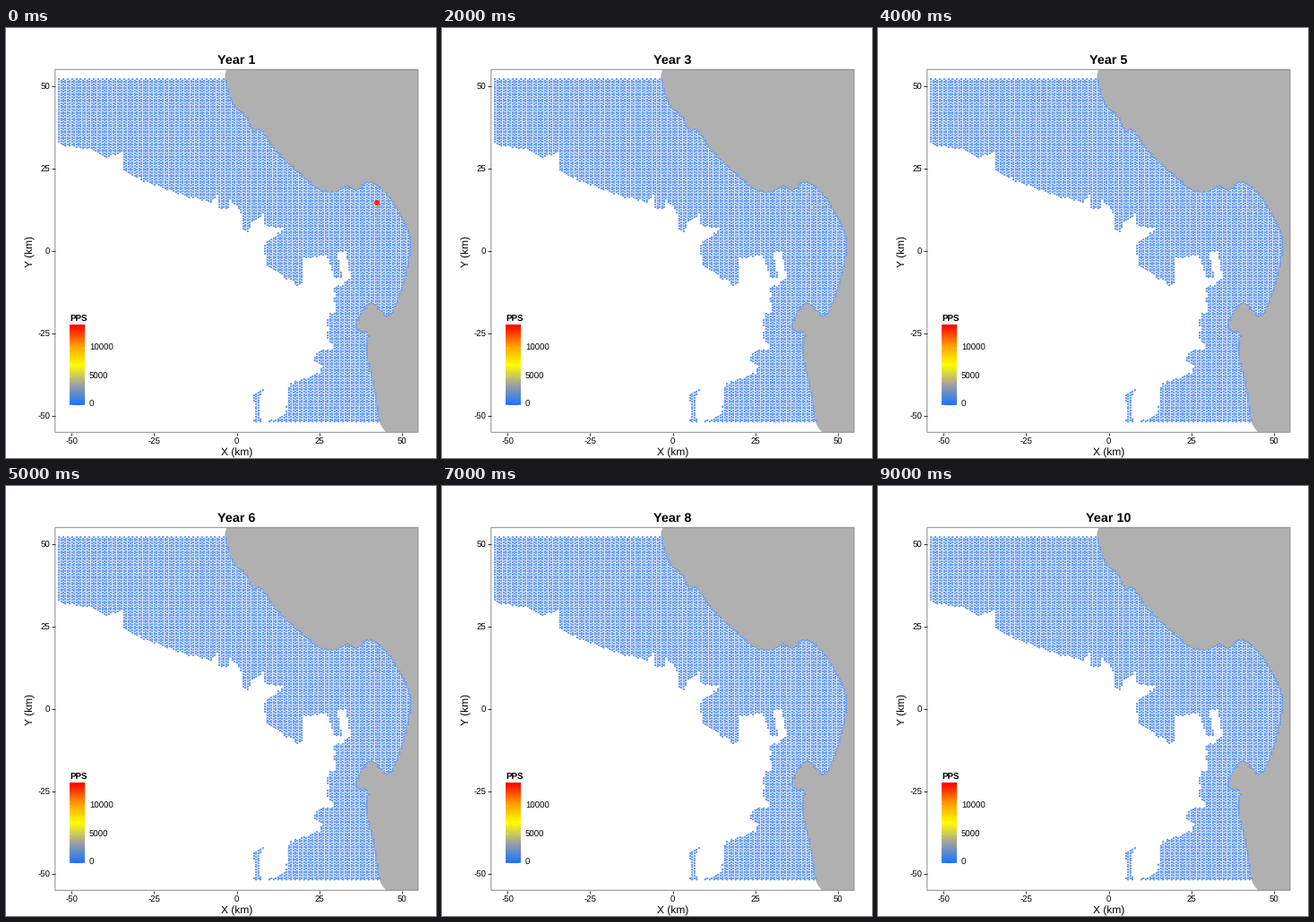
Recreate the animation shown at these times as a matplotlib script. Size 480 px wide and 480 px high, loop 10000 ms.

```python
import numpy as np
import matplotlib.pyplot as plt
from matplotlib.animation import FuncAnimation
from matplotlib.colors import LinearSegmentedColormap
from matplotlib.patches import Polygon, Rectangle
from matplotlib.path import Path

plt.rcParams["font.family"] = "Liberation Sans"
plt.rcParams["text.hinting"] = "none"
SIZE, DPI, YEARS = 480, 80, 10
PT = 72 / DPI
X0, Y0, KM = 257.5, 249, 3.682
LEFT, RIGHT, TOP, BOTTOM = 54.8, 460, 46.3, 451.3
DENSEST = 14000
ramp = LinearSegmentedColormap.from_list(
    "pps", ["#1c74ff", "#a0a0a0", "#ffff00", "#ff9a00", "#ff0000"])

# Key points of the shores in stage pixels, y pointing down
EAST = ("248,46 246,58 254,84 269,99 276,113 286,114 303,138 331,164 "
        "350,179 366,182 380,176 391,180 405,171 424,183 440,207 452,237 "
        "447,275 434,314 424,322 406,308 391,334 405,341 403,360 "
        "412,402 418,438 426,451")
WEST = ("291,441 313,430 316,397 350,386 353,376 345,373 346,363 366,358 "
        "357,345 360,319 367,317 366,289 377,287 384,278 380,249 370,250 "
        "375,278 367,280 358,254 331,257 332,285 326,287 290,265 289,237 "
        "300,234 310,224 291,221 287,208 273,218 271,227 265,226 263,207 "
        "250,191 247,203 238,202 235,184 229,195 205,189 160,173 131,160 "
        "130,139 112,145 92,135 58,129")
ISLE = "276,441 279,430 276,409 288,402 282,416 285,441"


def points(text):
    return np.array([p.split(",") for p in text.split()], float)


def smooth(keys, steps=6):
    """Catmull-Rom curve through the key points."""
    ext = np.vstack([keys[:1], keys, keys[-1:]])
    t = np.linspace(0, 1, steps, endpoint=False)[:, None]
    curve = [b + t * (c - a) / 2 + t**2 * (a - 2.5 * b + 2 * c - d / 2)
             + t**3 * (1.5 * (b - c) + (d - a) / 2)
             for a, b, c, d in zip(ext, ext[1:], ext[2:], ext[3:])]
    return np.vstack(curve + [keys[-1:]])


def rough(keys, step=4, jitter=0.8):
    """Broken line through the key points with small inlets."""
    rng = np.random.default_rng(5)
    parts = []
    for a, b in zip(keys, keys[1:]):
        n = max(1, int(np.hypot(*(b - a)) / step))
        leg = a + np.linspace(0, 1, n, endpoint=False)[:, None] * (b - a)
        leg[1:] += rng.normal(0, jitter, (n - 1, 2))
        parts.append(leg)
    return np.vstack(parts + [keys[-1:]])


coast = smooth(points(EAST))
land = np.vstack([coast, [(RIGHT, BOTTOM), (RIGHT, TOP)]])
sea = Path(np.vstack([[(58, 56)], coast, rough(points(WEST))]))
isle = Path(points(ISLE))

# Survey cells in columns, every other column shifted by half a cell
DX, DY = 2.42, 2.8
cx, cy = np.meshgrid(np.arange(59.2, 456, DX), np.arange(57.2, 440, DY))
cy[:, 1::2] += DY / 2
cells = np.column_stack([cx.ravel(), cy.ravel()])
cells = cells[sea.contains_points(cells) | isle.contains_points(cells)]
cells = cells[(cells[:, 1] > 56.5) & (cells[:, 1] < 441)]


def tint(density, alpha):
    rgba = ramp(np.clip(density / DENSEST, 0, 1))
    rgba[:, 3] = alpha
    return rgba


def field(year):
    """Colours of all cells, then places, colours and sizes of dense ones."""
    rng = np.random.default_rng(40 + year)
    base = tint(700 + rng.exponential(300, len(cells)), 0.45)

    mean = 4000 - 110 * year
    spread = rng.normal((419, 197), (9, 8), (30, 2))
    spread = spread[sea.contains_points(spread)]
    hot = np.array([cells[np.argmin(((cells - p) ** 2).sum(1))]
                    for p in spread])
    stray = rng.choice(cells, 14)
    peak = (414, 195) if year == 0 else rng.normal((413, 198), 3)

    pos = np.vstack([stray, hot, [peak]])
    density = np.r_[rng.uniform(1500, 2800, len(stray)),
                    rng.normal(mean, 600, len(hot)),
                    13600 if year == 0 else mean * 1.7 - 200 * year]
    diam = np.full(len(pos), 2.5)
    diam[-1] = 6 if year == 0 else 3.6 - 0.12 * year
    alpha = np.full(len(pos), 0.65 - 0.025 * year)
    alpha[:len(stray)] = 0.4
    alpha[-1] = 0.85 - 0.03 * year
    return base, pos, tint(density, alpha), (diam * PT) ** 2


fig = plt.figure(figsize=(SIZE / DPI, SIZE / DPI), dpi=DPI, facecolor="white")
ax = fig.add_axes([0, 0, 1, 1])
ax.axis("off")


def label(x, y, text, px, **kw):
    return ax.text(x, y, text, fontsize=px * PT, **kw)


def line(xs, ys, color, px=1, **kw):
    ax.plot(xs, ys, color=color, lw=px * PT, zorder=6,
            solid_capstyle="butt", **kw)


panel = Rectangle((LEFT, TOP), RIGHT - LEFT, BOTTOM - TOP, fill=False,
                  ec="#8c8c8c", lw=PT, zorder=5, snap=False)
ax.add_patch(panel)
shore = ax.add_patch(Polygon(land, fc="#b0b0b0", ec="#b0b0b0", lw=3 * PT,
                             zorder=1))
shore.set_clip_path(panel)
ax.scatter(*cells.T, s=(2.9 * PT) ** 2, marker="s", color="#8cb4f5",
           linewidths=0, zorder=2)
sheet = ax.scatter(*cells.T, s=(2.4 * PT) ** 2, linewidths=0, zorder=3)
marks = ax.scatter([], [], linewidths=0, zorder=4)

for k in range(-50, 51, 25):
    x, y = X0 + k * KM, Y0 - k * KM
    line([x, x], [451.5, 455], "#333333")
    line([51, 54.5], [y, y], "#333333")
    label(x, 465, str(k), 9.6, ha="center")
    label(49, y + 3.8, str(k), 9.6, ha="right")
label(X0, 478, "X (km)", 12, ha="center")
label(27, Y0, "Y (km)", 12, ha="center", va="center", rotation=90)
title = label(X0, 40, "", 14.4, ha="center", weight="bold")

label(71, 328, "PPS", 9.8, weight="bold")
ax.imshow(np.linspace(1, 0, 90)[:, None], cmap=ramp, vmin=0, vmax=1,
          extent=(71, 88, 421.5, 332), aspect="auto", zorder=4)
for density in (0, 5000, 10000):
    y = 419.8 - density * 0.00632
    for x in (71, 85):
        line([x, x + 3], [y, y], "white", 0.5, alpha=0.5)
    label(93, y + 3.4, str(density), 9.6)
ax.set_xlim(0, SIZE)
ax.set_ylim(SIZE, 0)


def draw(year):
    base, pos, colors, sizes = field(year)
    title.set_text(f"Year {year + 1}")
    sheet.set_facecolors(base)
    marks.set_offsets(pos)
    marks.set_facecolors(colors)
    marks.set_sizes(sizes)
    return title, sheet, marks


anim = FuncAnimation(fig, draw, frames=YEARS, interval=1000, repeat=True)
plt.show()
```
